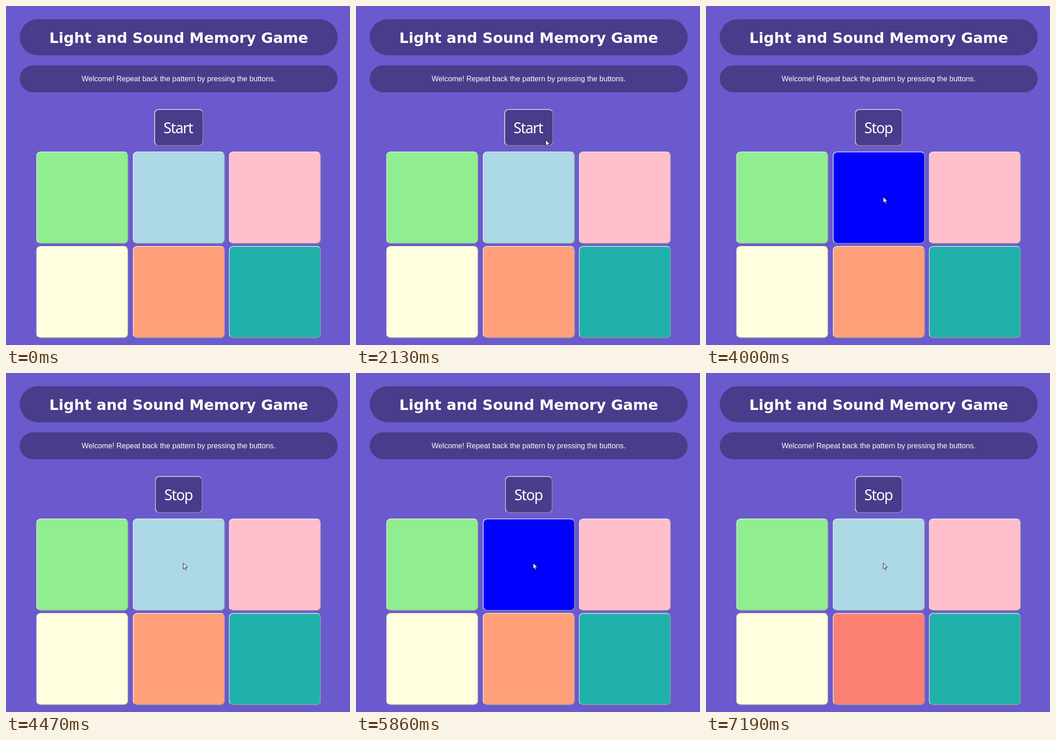
Write an HTML page that moves like this. It is 754 px wide and 743 px high and loops after 8000 ms.

```html
<!DOCTYPE html>
<html lang="en">
<head>
<meta charset="utf-8">
<title>Light and Sound Memory Game</title>
<style>
  html, body { margin: 0; width: 100%; height: 100%; overflow: hidden; background: #6a5acd; }
  #stage { position: relative; width: 754px; height: 743px; overflow: hidden; background: #6a5acd; color: #fff; }
  #stage > * { position: absolute; box-sizing: border-box; }

  .pill { left: 30px; width: 697px; margin: 0; background: #483d8b; text-align: center; white-space: nowrap; }
  h1.pill { top: 29px; height: 79px; border-radius: 40px; font: bold 32.1px/83px "DejaVu Sans", sans-serif; }
  p.pill { top: 130px; height: 59px; border-radius: 30px; font: 16.2px/59px "Liberation Sans", Arial, sans-serif; }

  /* buttons are laid out at 125% and scaled down, which gives 1.6px borders */
  .btn {
    left: 0; top: 0; width: 250px; height: 250px;
    border: 2px solid; border-color: #e8e8e8 #999 #999 #e8e8e8; border-radius: 12px;
    background: var(--c);
    transform-origin: 0 0; transform: translate(var(--x), var(--y)) scale(.808);
  }
  .label {
    --c: #483d8b; --y: 226px; height: 100px;
    font: 39.5px/98px "Noto Sans", sans-serif; letter-spacing: -1.9px; white-space: nowrap;
  }
  .start { --x: 325px; width: 133px; padding-left: 23px; animation: hide 8s step-end infinite; }
  .stop { --x: 326.5px; width: 129px; padding-left: 23.5px; animation: show 8s step-end infinite; }
  .blue { animation: blue 8s step-end infinite, press 8s step-end infinite; }
  .orange { animation: orange 8s step-end infinite; }

  @keyframes hide { 0% { visibility: visible } 30.55%, 100% { visibility: hidden } }
  @keyframes show { 0% { visibility: hidden } 30.55%, 100% { visibility: visible } }
  @keyframes blue {
    0%, 55.875%, 60.875%, 85.75%, 100% { background: #add8e6 }
    43.6%, 59.25%, 73.25% { background: #00f }
  }
  @keyframes press {
    0%, 60.875%, 100% { border-color: #e8e8e8 #999 #999 #e8e8e8 }
    59.25% { border-color: #999 #e8e8e8 #e8e8e8 #999 }
  }
  @keyframes orange { 0% { background: #ffa07a } 89.875%, 100% { background: #fa8072 } }

  #cursor {
    left: 0; top: 0; width: 12px; height: 18px; overflow: visible;
    fill: #fff; stroke: #111; stroke-width: 1;
    animation: move 8s infinite, tint 8s step-end infinite;
  }
  /* the pointer hops about every 70ms */
  @keyframes move {
    0% { transform: translate(718px, 770px); animation-timing-function: step-end }
    6.5% { transform: translate(718px, 770px); animation-timing-function: steps(4, start) }
    10% { transform: translate(726px, 602px); animation-timing-function: step-end }
    14.125% { transform: translate(726px, 602px); animation-timing-function: steps(1, start) }
    15% { transform: translate(701px, 569px); animation-timing-function: steps(4, start) }
    18.35% { transform: translate(545px, 396px); animation-timing-function: steps(2, start) }
    20% { transform: translate(462px, 307px); animation-timing-function: step-end }
    23.25% { transform: translate(462px, 307px); animation-timing-function: steps(6, start) }
    28.75% { transform: translate(392px, 286px); animation-timing-function: steps(5, start) }
    33.35% { transform: translate(373px, 283px); animation-timing-function: step-end }
    34.125% { transform: translate(373px, 283px); animation-timing-function: steps(5, start) }
    38.2% { transform: translate(402px, 303px); animation-timing-function: step-end }
    40.875% { transform: translate(402px, 303px); animation-timing-function: steps(11, start) }
    50.9% { transform: translate(388px, 418px); animation-timing-function: step-end }
    53.375% { transform: translate(388px, 418px); animation-timing-function: steps(4, start) }
    56.7%, 100% { transform: translate(388px, 416px); animation-timing-function: step-end }
  }
  @keyframes tint {
    0% { fill: #fff; stroke: #111 }
    60.875% { fill: #e6e6f2; stroke: #5d52c0 }
    73.25%, 100% { fill: #e8e8ee; stroke: #1c1c28 }
  }
</style>
</head>
<body>
<div id="stage">
  <h1 class="pill">Light and Sound Memory Game</h1>
  <p class="pill">Welcome! Repeat back the pattern by pressing the buttons.</p>

  <div class="btn label start">Start</div>
  <div class="btn label stop">Stop</div>

  <div class="btn" style="--x: 66.2px; --y: 319px; --c: #90ee90"></div>
  <div class="btn blue" style="--x: 277.9px; --y: 319px; --c: #add8e6"></div>
  <div class="btn" style="--x: 488.4px; --y: 319px; --c: #ffc0cb"></div>
  <div class="btn" style="--x: 66.2px; --y: 525.9px; --c: #ffffe0"></div>
  <div class="btn orange" style="--x: 277.9px; --y: 525.9px; --c: #ffa07a"></div>
  <div class="btn" style="--x: 488.4px; --y: 525.9px; --c: #20b2aa"></div>

  <svg id="cursor" viewBox="0 0 12 18"><path d="M.5 .5V13.3L3.4 10.6L5.4 15.5L7.5 14.6L5.5 9.9H9.6Z"/></svg>
</div>
</body>
</html>
```
